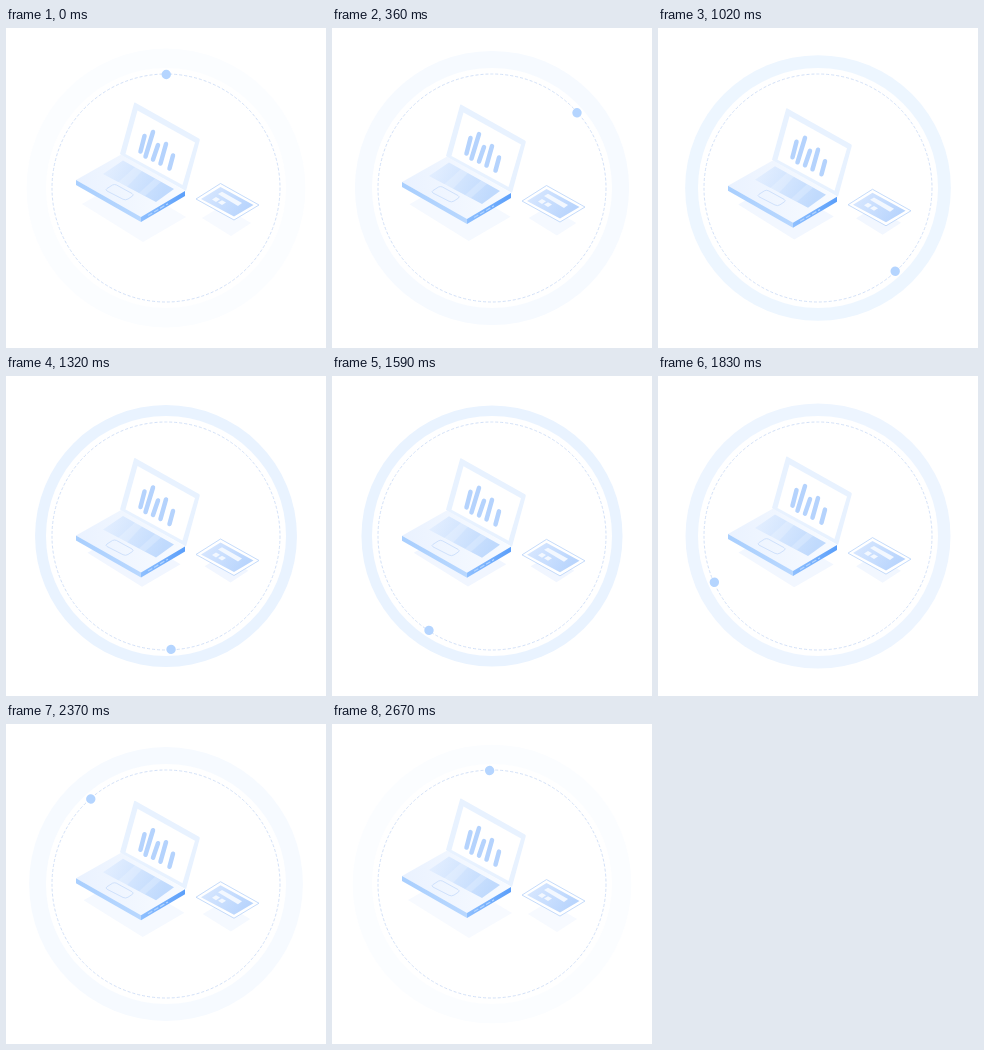
Recreate the animation shown at these times as an HTML page. Size 320 by 320 pixels, loop 2.7 s.

```html
<!DOCTYPE html>
<html lang="en">
<head>
<meta charset="utf-8">
<title>Floating laptop</title>
<style>
  html, body { margin: 0; width: 100%; height: 100%; overflow: hidden; background: #fff; }
  svg { display: block; width: 100%; height: 100%; }
</style>
</head>
<body>
<svg viewBox="0 0 320 320">
  <defs>
    <linearGradient id="deck" x1="0" y1="0" x2="1" y2="0">
      <stop offset="0" stop-color="#eaf2ff"/><stop offset="1" stop-color="#f8fbff"/>
    </linearGradient>
    <linearGradient id="keys" x1="0" y1="0" x2="1" y2=".3">
      <stop offset="0" stop-color="#e6f0ff"/><stop offset="1" stop-color="#c0dafd"/>
    </linearGradient>
    <linearGradient id="front" x1="0" y1="0" x2="1" y2="0">
      <stop offset="0" stop-color="#a9cffe"/><stop offset="1" stop-color="#b9d8ff"/>
    </linearGradient>
    <linearGradient id="side" x1="0" y1="0" x2="1" y2="0">
      <stop offset="0" stop-color="#8fc0ff"/><stop offset="1" stop-color="#5b9ffa"/>
    </linearGradient>
    <linearGradient id="face" x1="0" y1="0" x2="1" y2=".4">
      <stop offset="0" stop-color="#dbe9ff"/><stop offset="1" stop-color="#b9d5fd"/>
    </linearGradient>
  </defs>

  <circle id="halo" cx="160" cy="160" r="139"/>
  <circle cx="160" cy="160" r="120" fill="#fff"/>
  <circle cx="160" cy="160" r="114" fill="none" stroke="#d3e1f8" stroke-dasharray="3 2"/>

  <path id="laptopShadow" d="M76 176L118 152L180 189L137 214Z"/>
  <path id="cardShadow" d="M196 190L216 178L245 195L225 208Z"/>

  <g id="laptop">
    <path d="M70 152L116 126L179 163L135 189Z" fill="url(#deck)"/>
    <path d="M70 152L135 189V194L70 157Z" fill="url(#front)"/>
    <path d="M135 189L179 163V168L135 194Z" fill="url(#side)"/>
    <path d="M142 187.5L162 175.7" stroke="#b4d5ff" stroke-width="1.2" stroke-dasharray="5 2"/>
    <path d="M97 146L117 132.5L168 161L150 174Z" fill="url(#keys)"/>
    <path d="M112 154.5L129 139L136 143L121 159ZM133 165L149 150.5L155 154L139 168Z" fill="#fff" opacity=".2"/>
    <path d="M101 160.5L106.5 157Q108.5 156 110.5 157L126 165.5Q128 166.700 126.500 168L122 171Q119.500 172.500 117 171.200L101 163Q99 161.800 101 160.500Z" fill="none" stroke="#cfe1fc"/>
    <path d="M129 74.500L193 110.500Q194 111 193.700 112.500L180 163L114 126L128 75.500Q128.300 74.200 129 74.500Z" fill="#e8f2ff"/>
    <path d="M131.500 82.500L189 114.500L176.500 157L119.500 126Z" fill="#fff"/>
    <path d="M138.500 108L134.500 123.500M147 104L139.500 128.500M152 117L147 131.500M160 116L154.500 135.500M167 127.500L163.500 140.500"
      fill="none" stroke="#b5d3fd" stroke-width="4.500" stroke-linecap="round"/>
  </g>

  <g id="card">
    <path d="M190 171L214.500 155.500L253 177L228 192Z" fill="#fff" stroke="#bfd7fa" stroke-width=".9"/>
    <path d="M195 171L214.500 159L247.500 177L228 188.500Z" fill="url(#face)"/>
    <path d="M212 166L216 163.800L236 175L232 178Z" fill="#f3f8ff"/>
    <path d="M206 171.500L210 169L214 171.200L210 174ZM212 174.500L216 172.200L220 174.500L216 177Z" fill="#f3f8ff"/>
  </g>

  <circle id="dot" cx="160" cy="46.500" r="4.700" fill="#b5d5ff"/>
</svg>

<script>
const LOOP = 2700, TURN = 2680, LOW = 1500;
const el = id => document.getElementById(id);
const mix = (a, b, p) => a + (b - a) * p;
const tint = (a, b, p) => `rgb(${a.map((v, i) => Math.round(mix(v, b[i], p))).join()})`;

const halo = el('halo'), laptop = el('laptop'), card = el('card'), dot = el('dot');
const shadows = [[el('laptopShadow'), 128, 183], [el('cardShadow'), 220.5, 193]];

function draw(ms) {
  const t = ms % LOOP;
  // 0 at the highest point, 1 at the lowest
  const p = t < LOW ? t / LOW : Math.max(0, (TURN - t) / (TURN - LOW));
  const drop = `translate(0 ${8.5 * p})`;

  halo.setAttribute('r', mix(139.4, 129.8, p));
  halo.setAttribute('fill', tint([251, 253, 255], [231, 242, 255], p));
  laptop.setAttribute('transform', drop);
  card.setAttribute('transform', drop);
  for (const [node, x, y] of shadows) {
    node.setAttribute('transform', `translate(${x} ${y}) scale(${mix(1, 0.88, p)}) translate(${-x} ${-y})`);
    node.setAttribute('fill', tint([247, 250, 255], [240, 246, 255], p));
  }
  dot.setAttribute('transform', `rotate(${t / TURN * 360 % 360} 160 160)`);
}

const start = performance.now();
function tick() {
  draw(performance.now() - start);
  requestAnimationFrame(tick);
}
tick();
</script>
</body>
</html>
```
